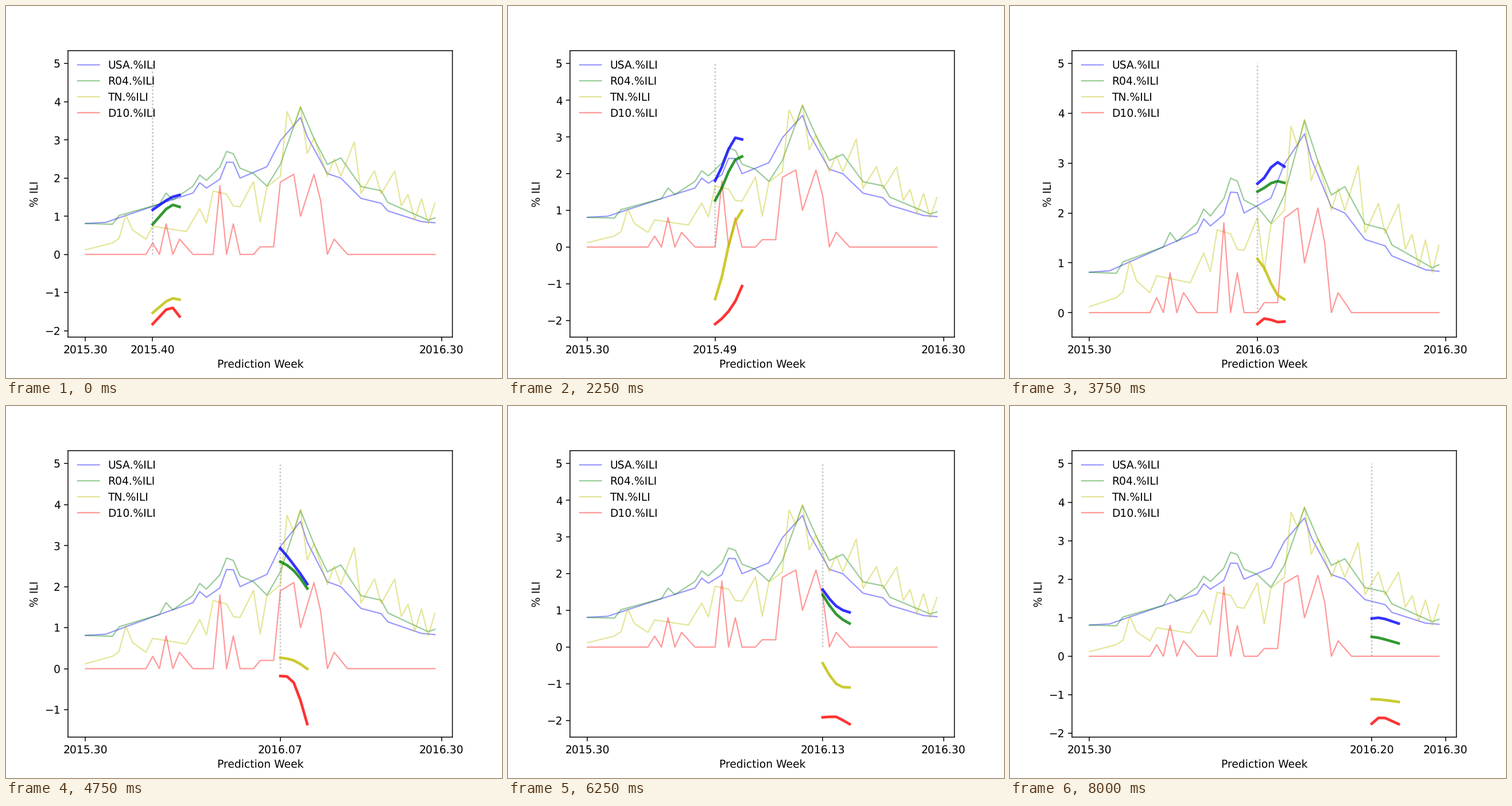
Recreate the animation shown at these times as a matplotlib script. Size 864 by 648 pixels, loop 8250 ms.

```python
import numpy as np
import matplotlib.pyplot as plt
from matplotlib.animation import FuncAnimation

plt.rcParams.update({
    "path.snap": False,
    "text.hinting": "none",
    "lines.dotted_pattern": (1.1, 1.1),
})

FRAMES, STEP_MS = 33, 250
FIRST, SPAN = 10, 5          # first forecast week, weeks per forecast
KNOT_GAP = 3                 # weeks between forecast knots
TOP = 5.0
weeks = np.arange(53)


def path(points):
    """Weekly values on straight lines between {week: value} key points."""
    return np.interp(weeks, list(points), list(points.values()))


def smooth(x, y):
    """Cubic curve through evenly spaced knots, evaluated at x (in knots)."""
    y = np.asarray(y)
    m = np.gradient(y)
    i = np.clip(np.floor(x).astype(int), 0, len(y) - 2)
    t = x - i
    blend = t * t * (3 - 2 * t)
    return (y[i] + (y[i + 1] - y[i]) * blend
            + t * (1 - t) * ((1 - t) * m[i] - t * m[i + 1]))


usa = path({0: 0.81, 3: 0.84, 12: 1.38, 16: 1.61, 17: 1.88, 18: 1.74,
            20: 1.97, 21: 2.42, 22: 2.41, 23: 2.0, 27: 2.3, 29: 2.98,
            32: 3.59, 33: 3.09, 36: 2.12, 38: 2.0, 41: 1.47, 44: 1.34,
            45: 1.14, 50: 0.86, 52: 0.83})
region = path({0: 0.81, 4: 0.79, 5: 1.02, 11: 1.32, 12: 1.61, 13: 1.43,
               16: 1.79, 17: 2.08, 18: 1.94, 20: 2.29, 21: 2.7, 22: 2.64,
               23: 2.26, 25: 2.12, 27: 1.79, 29: 2.36, 32: 3.86, 34: 3.04,
               36: 2.36, 38: 2.53, 41: 1.78, 44: 1.67, 45: 1.36, 51: 0.9,
               52: 0.96})
state = path({0: 0.12, 4: 0.3, 5: 0.42, 6: 1.04, 7: 0.64, 9: 0.4, 10: 0.74,
              15: 0.6, 17: 1.2, 18: 0.82, 19: 1.66, 21: 1.58, 22: 1.27,
              23: 1.25, 25: 1.91, 26: 0.84, 27: 1.77, 29: 2.05, 30: 3.74,
              31: 3.33, 32: 3.88, 33: 2.65, 35: 2.85, 36: 2.05, 40: 2.65,
              41: 1.9, 46: 1.88, 48: 1.27, 52: 1.05})
# Late zigzag: every third week peaks, then every second one.
zigzag = np.where(weeks < 46, (weeks + 1) % 3 - 1, 1 - 2 * (weeks % 2))
zigzag[weeks < 33] = 0
state += 0.3 * zigzag
district = path({9: 0, 10: 0.3, 11: 0, 12: 0.8, 13: 0, 14: 0.4, 16: 0,
                 19: 0, 20: 1.8, 21: 0, 22: 0.8, 23: 0, 25: 0, 26: 0.2,
                 28: 0.2, 29: 1.9, 31: 2.1, 32: 1.0, 34: 2.1, 35: 1.4,
                 36: 0, 37: 0.4, 39: 0})

# Name, colour, observed values, forecast knots
series = [
    ("USA.%ILI", "b", usa, [1.17, 1.51, 1.61, 1.81, 2.98, 2.59, 3.02,
                            2.53, 1.82, 1.12, 0.92, 1.0, 0.85]),
    ("R04.%ILI", "g", region, [0.79, 1.3, 1.02, 1.27, 2.38, 2.43, 2.64,
                               2.39, 1.7, 0.9, 0.57, 0.48, 0.335]),
    ("TN.%ILI", "y", state, [-1.53, -1.15, -1.37, -1.42, 0.7, 1.08, 0.35,
                             0.2, -0.17, -1.0, -1.1, -1.12, -1.185]),
    ("D10.%ILI", "r", district, [-1.825, -1.4, -2.25, -2.1, -1.48, -0.23,
                                 -0.19, -0.345, -1.78, -1.9, -2.12, -1.6,
                                 -1.76]),
]


def week_name(i):
    year, week = (2015, 30 + i) if i <= 22 else (2016, i - 22)
    return f"{year}.{week:02d}"


fig, ax = plt.subplots(figsize=(6.4, 4.8), dpi=135)
for name, color, values, _ in series:
    ax.plot(weeks, values, color=color, alpha=0.4, lw=1.2, label=name)
marker, = ax.plot([FIRST, FIRST], [0, TOP], ":", color="gray", alpha=0.4)
bold = [ax.plot([], [], color=s[1], alpha=0.8, lw=2.5)[0] for s in series]
ax.set_xlim(-2.6, 54.6)
ax.set_xlabel("Prediction Week")
ax.set_ylabel("% ILI")
ax.legend(loc="upper left", frameon=False)


def update(step):
    start = FIRST + step
    marker.set_xdata([start, start])
    ahead = np.arange(SPAN)
    low = 0.0
    for line, (*_, knots) in zip(bold, series):
        y = smooth((step + ahead) / KNOT_GAP, knots)
        line.set_data(start + ahead, y)
        low = min(low, y.min())
    pad = 0.05 * (TOP - low)
    ax.set_ylim(low - pad, TOP + pad)
    ax.set_xticks([0, start, 53], ["2015.30", week_name(start), "2016.30"])
    return [marker, *bold]


anim = FuncAnimation(fig, update, frames=FRAMES, interval=STEP_MS,
                     repeat=True, repeat_delay=0, blit=False)
plt.show()
```
